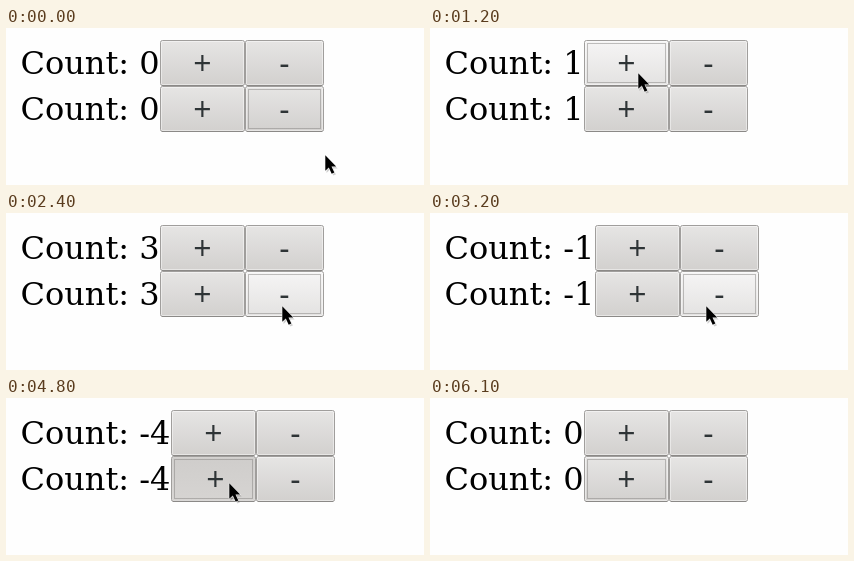
Recreate the animation shown at these times as an HTML page. Size 418x157 px, loop 6.6 s.

```html
<!DOCTYPE html>
<html lang="en">
<head>
<meta charset="utf-8">
<title>Counters</title>
<style>
  html, body { margin: 0; width: 100%; height: 100%; overflow: hidden; background: #fefefe; }
  svg { display: block; width: 418px; height: 157px; }
  .count { font: 32px "DejaVu Serif", serif; fill: #000; white-space: pre; }
  .face { fill: url(#normal); stroke: #a09e9c; }
  .shine { fill: none; stroke: #fff; stroke-opacity: .45; }
  .edge { stroke: #8b8987; }
  .sign { font: 32px "Open Sans", sans-serif; fill: #2e3436; text-anchor: middle; }
  .ring { fill: none; stroke: #858381; stroke-dasharray: 1 1; visibility: hidden; }
  .hover .face { fill: url(#hover); }
  .pressed .face { fill: url(#pressed); }
  .pressed .sign { transform: translateX(2px); }
  .pressed .shine { stroke-opacity: .1; }
  .focus .ring { visibility: visible; }
</style>
</head>
<body>
<svg viewBox="0 0 418 157">
  <defs>
    <linearGradient id="normal" x2="0" y2="1"><stop stop-color="#e6e5e4"/><stop offset="1" stop-color="#d2d0ce"/></linearGradient>
    <linearGradient id="hover" x2="0" y2="1"><stop stop-color="#f6f5f5"/><stop offset="1" stop-color="#e3e2e1"/></linearGradient>
    <linearGradient id="pressed" x2="0" y2="1"><stop stop-color="#cfcdcb"/><stop offset="1" stop-color="#d6d4d2"/></linearGradient>
  </defs>
  <g id="rows"></g>
  <g id="cursor">
    <path d="M1.5 2.5V18l3.8-3.4 3 6 2.6-1.2-2.8-5.8h4.6z" fill="#000" opacity=".18"/>
    <path d="M.3 .3V15.8l3.5-3.2 2.9 6.2 2.6-1.2-2.8-6h4.7z" fill="#000" stroke="#fff" stroke-width="1" paint-order="stroke"/>
  </g>
</svg>
<script>
const LOOP = 6600, STEP = 100, ROW_HEIGHT = 46;
const TOP_PLUS = 0, TOP_MINUS = 1, LOW_PLUS = 2, LOW_MINUS = 3;

// button, then [press, release] times
const clicks = [
  [TOP_PLUS, [1100, 1200], [1300, 1400], [1500, 1600], [1700, 1800]],
  [LOW_MINUS, [2300, 2400], [2500, 2600], [2700, 2800], [2900, 3000], [3200, 3200]],
  [TOP_MINUS, [3700, 3800], [3900, 4000], [4100, 4200]],
  [LOW_PLUS, [4800, 4900], [5000, 5100], [5200, 5300], [5400, 5800]],
].flatMap(([button, ...spans]) => spans.map(([press, release]) => ({ button, press, release })));

// time, x, y of the pointer tip
const path = [
  [200, 319, 127], [1000, 208, 45], [1900, 208, 45], [2200, 276, 93],
  [3200, 276, 93], [3600, 275, 41], [4200, 275, 41], [4500, 228, 85],
  [4600, 223, 85], [5800, 223, 85], [5900, 171, 60],
];
const LEAVE = 5900, HIDE = 6100;

function buttonMarkup(x, width, sign) {
  return `<g class="button" transform="translate(${x} 12)">
    <rect class="face" x=".5" y=".5" width="${width - 1}" height="45" rx="2"/>
    <rect class="shine" x="1.5" y="1.5" width="${width - 3}" height="43" rx="1"/>
    <path class="edge" d="M2 45.5H${width - 2}"/>
    <rect class="ring" x="3.5" y="3.5" width="${width - 7}" height="39"/>
    <text class="sign" x="${width / 2}" y="35">${sign}</text></g>`;
}

const rows = document.getElementById("rows");
rows.innerHTML = [0, 1].map(row => `<g transform="translate(0 ${row * ROW_HEIGHT})">
  <text class="count" x="14.5" y="46"></text>
  <g class="pair">${buttonMarkup(154, 85, "+")}${buttonMarkup(239, 79, "-")}</g></g>`).join("");
const labels = rows.querySelectorAll(".count");
const pairs = rows.querySelectorAll(".pair");
const buttons = rows.querySelectorAll(".button");
const cursor = document.getElementById("cursor");

function pointerAt(time) {
  const next = path.findIndex(point => point[0] > time);
  if (next === 0) return path[0].slice(1);
  if (next < 0) return path[path.length - 1].slice(1);
  const [t0, x0, y0] = path[next - 1], [t1, x1, y1] = path[next];
  const p = (time - t0) / (t1 - t0), eased = p * p * (3 - 2 * p);
  return [x0 + (x1 - x0) * eased, y0 + (y1 - y0) * eased].map(Math.round);
}

function buttonUnder(x, y, shift) {
  const left = x - shift;
  if (left < 154 || left >= 318 || y < 12 || y >= 104) return -1;
  return (y >= 58 ? 2 : 0) + (left >= 239 ? 1 : 0);
}

function render(time) {
  let count = 0, focus = LOW_MINUS, pressed = -1;
  for (const { button, press, release } of clicks) {
    if (time >= press) focus = button;
    if (time >= release) count += button % 2 ? -1 : 1;
    else if (time >= press) pressed = button;
  }
  const shift = count < 0 ? 11 : 0;
  const [x, y] = pointerAt(time);
  const hover = time < LEAVE ? buttonUnder(x, y, shift) : -1;

  labels.forEach(label => { label.textContent = `Count: ${count}`; });
  pairs.forEach(pair => pair.setAttribute("transform", `translate(${shift} 0)`));
  buttons.forEach((button, i) => {
    button.classList.toggle("focus", i === focus);
    button.classList.toggle("hover", i === hover);
    button.classList.toggle("pressed", i === pressed);
  });
  cursor.setAttribute("transform", `translate(${x} ${y})`);
  cursor.setAttribute("visibility", time < HIDE ? "visible" : "hidden");
}

const start = performance.now();
let shown = -1;
function tick() {
  const elapsed = (performance.now() - start) % LOOP;
  const time = Math.floor(elapsed / STEP) * STEP;
  if (time !== shown) render(shown = time);
  requestAnimationFrame(tick);
}
tick();
</script>
</body>
</html>
```
